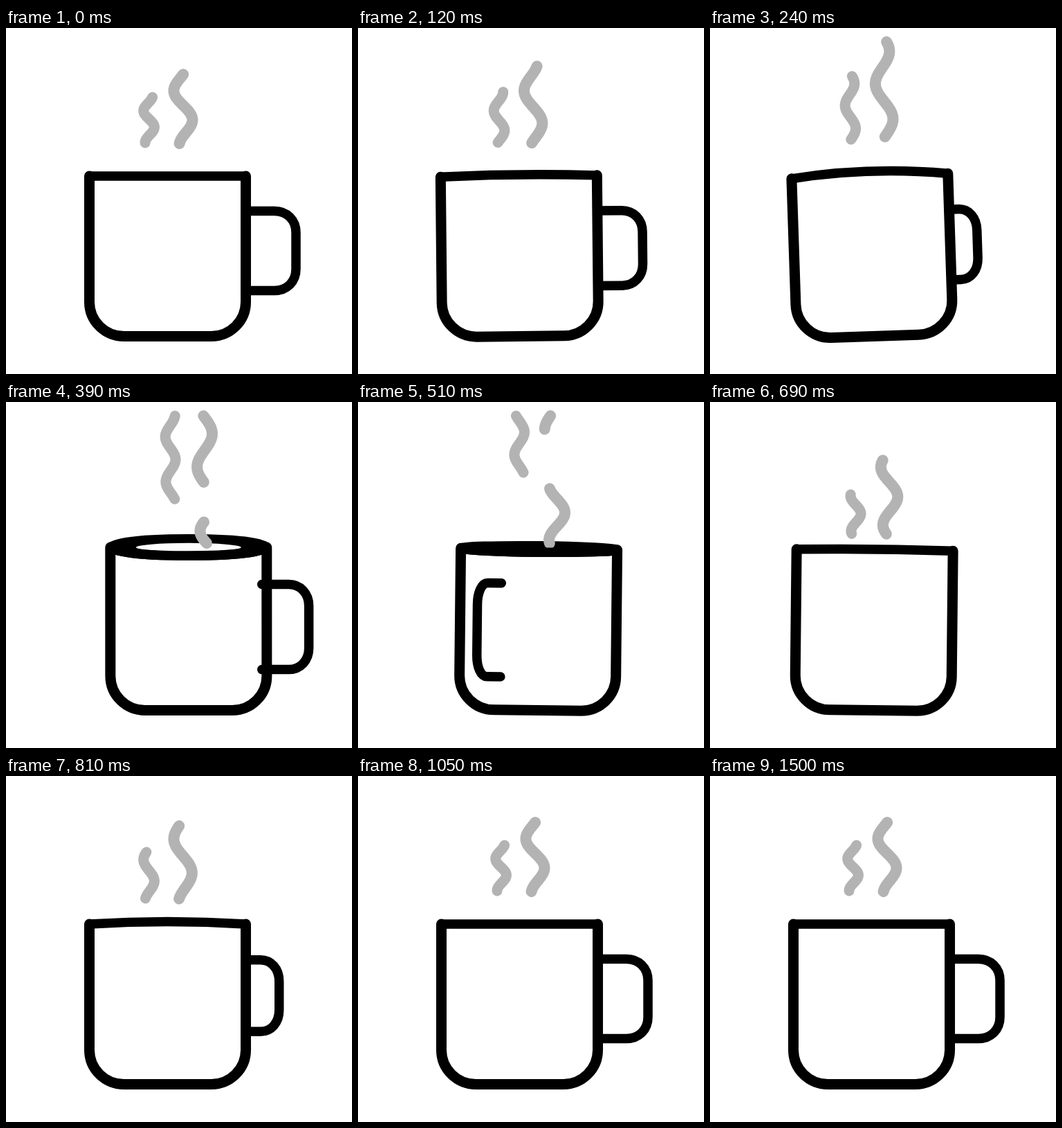
These frames come from a looping animation (500x500 px, 1.56 s). An HTML page:

```html
<!DOCTYPE html>
<html lang="en">
<head>
<meta charset="utf-8">
<title>Coffee cup</title>
<style>
html, body { margin: 0; width: 100%; height: 100%; overflow: hidden; background: #fff; }
svg { display: block; width: 100vw; height: 100vh; }
path { fill: none; stroke: #000; stroke-width: 13.5; stroke-linecap: round; stroke-linejoin: round; }
#steam path { stroke: #b3b3b3; }
#body { fill: #fff; stroke: none; }
#walls { stroke-width: 15; }
#rimBack { fill: #000; }
#hole { fill: #fff; }
</style>
</head>
<body>
<svg viewBox="0 0 500 500">
  <g id="back"><path id="handleBack"/><path id="body"/><path id="rimBack"/><ellipse id="hole" rx="76"/></g>
  <g id="steam"></g>
  <g id="front"><path id="walls"/><path id="rimFront"/><path id="handleFront"/></g>
</svg>
<script>
const LOOP = 1560, STEP = 30, REST_X = 233.5, R = 113, REACH = 185.5;
const $ = id => document.getElementById(id);
const set = (id, d) => $(id).setAttribute("d", d);

const mix = (a, b, u) => a + (b - a) * u;
const ramp = (t, a, b) => Math.min(1, Math.max(0, (t - a) / (b - a)));
const smooth = u => u * u * (3 - 2 * u);
const hop = (t, a, b, skew = 1) => Math.sin(Math.PI * ramp(t, a, b) ** skew) ** 2;

// Wind up backwards, then one full turn
const spin = t => t < 250 ? -35 * smooth(t / 250)
  : mix(-35, 360, smooth(1 - (1 - ramp(t, 250, 1000)) ** 1.3));
const sway = t => 32 * hop(t, 230, 770, .7);
const windUp = t => hop(t, 0, 400, 1.4);
const tilt = t => 1.2 * hop(t, 420, 780) - 1.9 * windUp(t);
const bulge = t => 13.5 * hop(t, 270, 570) - 7 * windUp(t) - 3.5 * hop(t, 600, 1020);

// Resting wisps: bend is the height of a left bend, born and gone are times
const wisps = [
  { width: 15, top: 100, bottom: 166, x: 206, lean: .05, amp: 7.3, wave: 46, bend: 120,
    born: 510, gone: 660, stretch: 390, speed: 1.2 },
  { width: 16, top: 67, bottom: 167, x: 254, lean: .1, amp: 11.5, wave: 79, bend: 92,
    born: 315, gone: 540, stretch: 240, speed: 1.65 }
];

// A resting wisp stretches up, then drifts off the top
const leaving = (w, t) => ({
  top: mix(w.top, 20, ramp(t, 0, w.stretch) ** 2),
  bottom: mix(w.bottom, 12, ramp(t, 0, w.gone) ** 3.4),
  x: w.x - 5 * ramp(t, 0, 240) + 1.2 * sway(t),
  lean: w.lean * (1 - ramp(t, 0, 500)),
  wave: w.wave + 19 * ramp(t, 0, 240),
  bend: w.bend - w.speed * Math.max(0, t - 230) ** .8
});

// A new wisp rises out of the cup and settles
function rising(w, t) {
  const left = 1 - ramp(t, w.born, 1050), held = (1 - ramp(t, 600, 1050)) ** 2;
  return {
    top: mix(w.top, 214, left ** 3),
    bottom: mix(w.bottom, 204, held),
    x: w.x + 1.25 * sway(t),
    lean: w.lean * (1 - held),
    wave: w.wave + 14 * hop(t, 600, 1050),
    bend: w.bend + 180 * left ** 6
  };
}

function curve({ top, bottom, x, lean, wave, bend }, amp) {
  if (bottom - top < 1) return "";
  const pts = [];
  for (let i = 0; i <= 32; i++) {
    const y = mix(top, bottom, i / 32), d = y - bend;
    pts.push((x + lean * d - amp * Math.cos(2 * Math.PI * d / wave)).toFixed(2) + " " + y.toFixed(2));
  }
  return "M" + pts.join("L");
}

const steam = wisps.flatMap(w => [leaving, rising].map(move => {
  const path = document.createElementNS("http://www.w3.org/2000/svg", "path");
  path.style.strokeWidth = w.width;
  $("steam").append(path);
  return t => path.setAttribute("d", curve(move(w, t), w.amp));
}));

function handle(cx, angle) {
  const c = Math.cos(angle), s = Math.sin(angle);
  const half = 57.5 * (1 + .2 * s), mid = 322 + 9 * s, round = 31, pull = 13;
  const x = u => cx + u * c, y1 = mid - half, y2 = mid + half;
  return `M${x(R)} ${y1}L${x(REACH - round)} ${y1}`
    + `C${x(REACH - pull)} ${y1} ${x(REACH)} ${y1 + pull} ${x(REACH)} ${y1 + round}`
    + `V${y2 - round}`
    + `C${x(REACH)} ${y2 - pull} ${x(REACH - pull)} ${y2} ${x(REACH - round)} ${y2}L${x(R)} ${y2}`;
}

function draw(t) {
  const cx = REST_X + sway(t), e = bulge(t), angle = spin(t) * Math.PI / 180;
  const l = cx - R, r = cx + R, y = 214 - Math.max(0, e) * .33;
  const shell = `M${l} ${y}V396A50 49.5 0 0 0 ${l + 50} 445.5H${r - 50}A50 49.5 0 0 0 ${r} 396V${y}`;
  const bow = `Q${cx} ${y + 2 * Math.min(0, e)} `;
  const arc = `A${R} ${e} 0 0 `;
  const open = e > .05, inFront = Math.sin(angle) > 0;

  set("body", shell + bow + `${l} ${y}Z`);
  set("walls", shell);
  set("rimBack", open ? `M${l} ${y}${arc}1 ${r} ${y}${arc}1 ${l} ${y}Z` : "");
  set("rimFront", `M${l} ${y}${open ? arc + "0 " : bow}${r} ${y}`);
  $("hole").setAttribute("cx", cx);
  $("hole").setAttribute("cy", y);
  $("hole").setAttribute("ry", Math.max(0, e - 6));

  const grip = handle(cx, angle);
  set("handleBack", inFront ? "" : grip);
  set("handleFront", inFront ? grip : "");
  for (const id of ["back", "front"]) $(id).setAttribute("transform", `rotate(${tilt(t)} ${cx} 330)`);
  for (const update of steam) update(t);
}

const start = performance.now();
function tick(now) {
  const t = Math.max(0, now - start) % LOOP;
  draw(Math.min(1500, Math.floor(t / STEP) * STEP));
  requestAnimationFrame(tick);
}
draw(0);
requestAnimationFrame(tick);
</script>
</body>
</html>
```
